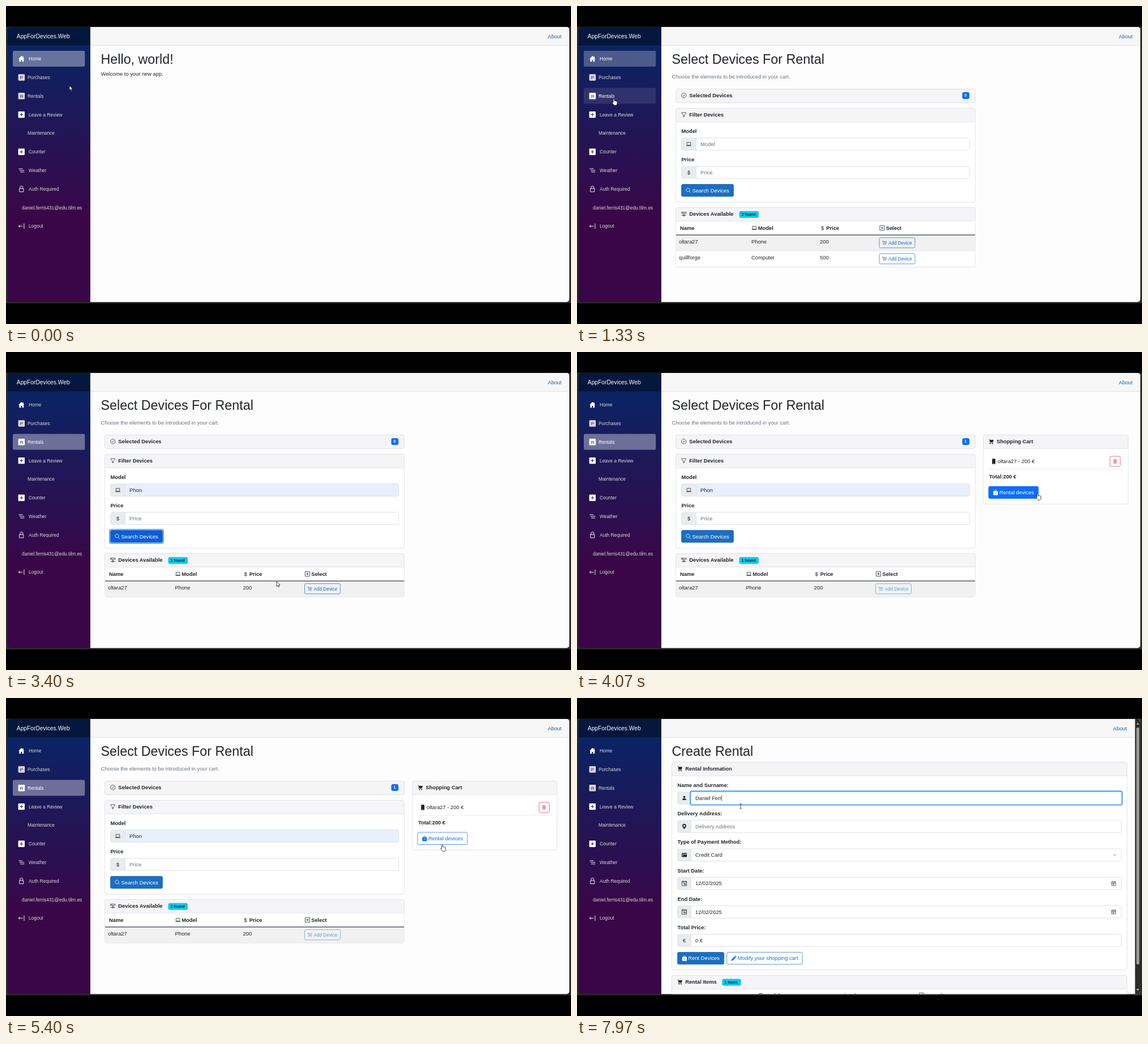
Animation of 998x561 px, one loop 8 s. Source, as an HTML page:

```html
<!DOCTYPE html>
<html lang="en">
<head>
<meta charset="utf-8">
<title>AppForDevices.Web</title>
<style>
html, body { margin: 0; width: 998px; height: 561px; overflow: hidden; background: #000; }
svg { display: block; font-family: "Liberation Sans", Arial, sans-serif; white-space: pre; }
</style>
</head>
<body>
<svg width="998" height="561" viewBox="0 0 998 561">
  <defs>
    <linearGradient id="side" x1="0" y1="0" x2="0" y2="1">
      <stop offset="0" stop-color="#052767"/><stop offset=".7" stop-color="#3a0647"/>
    </linearGradient>
    <clipPath id="window"><rect x="2.5" y="37" width="992.5" height="485.3" rx="5"/></clipPath>
  </defs>
  <rect y="36.5" width="998" height="488" fill="#2a2d29"/>
  <g id="view" clip-path="url(#window)"></g>
  <g id="pointer" stroke="#000" stroke-width=".7" stroke-linejoin="round"></g>
</svg>
<script>
const LOOP = 8000, OPEN_SELECT = 1330, SEARCH = 3050, ADD = 3700, OPEN_CREATE = 5500;
const INK = '#212529', GRAY = '#6c757d', LINE = '#dcdfe3', BLUE = '#0d6efd', BUTTON = '#1b6ec2', RING = '#258cfb';
const view = document.getElementById('view'), pointer = document.getElementById('pointer');
const pen = document.createElement('canvas').getContext('2d');
pen.font = '9.33px "Liberation Sans", Arial, sans-serif';

// 16-unit icons: [path, filled]
const ICONS = {
  house: ['M8 .8 .8 8h1.7v7h4v-4.5h3V15h4V8h1.7L13 5.8V2h-2v1.8z', 1],
  letter: ['M2 0h12q2 0 2 2v12q0 2-2 2H2q-2 0-2-2V2q0-2 2-2z', 1],
  plusFill: ['M1.5 0h13q1.5 0 1.5 1.5v13q0 1.5-1.5 1.5h-13Q0 16 0 14.5v-13Q0 0 1.5 0zM7.3 4v3.3H4v1.4h3.3V12h1.4V8.7H12V7.3H8.7V4z', 1],
  list: ['M1 4h10M3 8h12M5 12h10'],
  lock: ['M4.5 7V4a3.5 3.5 0 0 1 7 0v3M3 7h10v8H3z'],
  logout: ['M1 8h10M4.5 4.500 1 8l3.500 3.500M14.500 1.500v13'],
  check: ['M8 .8a7.200 7.200 0 1 0 .01 0zM4.500 8l2.500 2.800 4.500-5.500'],
  funnel: ['M1.500 1.500h13V4l-5 5v4.500l-3 1V9l-5-5z'],
  laptop: ['M2.500 3h11v8.500h-11zM.3 13.300h15.400'],
  search: ['M6.500 1a5.500 5.500 0 1 0 .01 0M10.500 10.500l5 5'],
  stack: ['M1 2.500h14v4H1zM3 4.500h2M8 6.500V12M1 12.500h5m4 0h5M6 11h4v3H6z'],
  plus: ['M1 1h14v14H1zM8 4v8M4 8h8'],
  cart: ['M0 1h3l.6 2H15l-1.500 7.500H5l.3 1.500H13v1H4.500L2.300 2H0zM5 13a1.500 1.500 0 1 0 .01 0zM12 13a1.500 1.500 0 1 0 .01 0z', 1],
  cartAdd: ['M0 1.500h2.500l2 9h9l1.500-7H3M9 5v4M7 7h4M5.500 12.500a1 1 0 1 0 .01 0M12 12.500a1 1 0 1 0 .01 0'],
  bag: ['M4.500 4V3.500a3.500 3.500 0 0 1 7 0V4H15v10q0 2-2 2H3q-2 0-2-2V4zM5.700 4h4.600v-.5a2.300 2.300 0 0 0-4.600 0zM7.500 12.500l4-4-.8-.8-3.200 3.200L6 9.400l-.8.8z', 1],
  phone: ['M5 0h6q2 0 2 2v12q0 2-2 2H5q-2 0-2-2V2q0-2 2-2zM8 13a1 1 0 1 0 .01 0z', 1],
  trash: ['M1.500 3.500h13M5.500 3V1.500h5V3M3 4l.6 11h8.800L13 4M6 6v6.500M8 6v6.500M10 6v6.500'],
  person: ['M8 1.500a3.200 3.200 0 1 0 .01 0zM2 14q0-5 6-5t6 5z', 1],
  pin: ['M8 0a6 6 0 0 1 6 6q0 4-6 10Q2 10 2 6a6 6 0 0 1 6-6zM8 3a3 3 0 1 0 .01 0z', 1],
  card: ['M0 4q0-2 2-2h12q2 0 2 2v1H0zM0 7h16v5q0 2-2 2H2q-2 0-2-2zM2 9v2h3V9z', 1],
  calendar: ['M1 2h14v13H1zM1 4h14M4 0v2M12 0v2M5 8h2v4M9 8h3v4H9z'],
  picker: ['M1.500 1.500h13v13h-13zM1.500 5h13M4 8h8M4 11h6M4 0v2M12 0v2'],
  pencil: ['M12.500 0 16 3.500 14 5.500 10.500 2zM9.700 2.800l3.500 3.500L5 14.500l-5 1.500 1.500-5z', 1],
  chevron: ['M2 5l6 6 6-6']
};
const NAV = [['Home', 'house', 40], ['Purchases', 'P', 38], ['Rentals', 'R', 38], ['Leave a Review', 'plusFill', 40],
  ['Maintenance', '', 38], ['Counter', 'plusFill', 40], ['Weather', 'list', 40], ['Auth Required', 'lock', 40],
  ['daniel.ferris431@edu.tilm.es', '', 28], ['Logout', 'logout', 40]];
// pointer tip: time, x, y
const PATH = [[0, 112, 140.4], [400, 112, 140.4], [870, 100, 133], [1170, 65, 163.5], [1500, 65, 163.5], [2080, 290, 243],
  [2700, 290, 243], [2980, 235, 327], [3130, 235, 327], [3400, 478, 405], [3640, 560, 419], [3760, 560, 419],
  [4070, 813.5, 249.5], [4500, 800, 252], [5000, 775, 251], [5400, 770.5, 258.8], [5560, 770.5, 258.8],
  [6130, 328, 181], [6350, 300, 178], [6600, 289, 191]];
const NAME = 'Daniel Ferr', NAME_TIMES = [6830, 6950, 7100, 7300, 7400, 7500, 7570, 7730, 7780, 7830, 7970];
const MODEL_TIMES = [2470, 2570, 2670, 2770];
const CURSORS = {
  arrow: 'M0 0v8.600l2-1.900 1.300 3 1.400-.6-1.300-2.900h2.700z',
  hand: 'M-1 .7q1-1.400 2 0v3.300q1-.7 1.800.1 1-.5 1.700.4 1.500-.3 1.500 1v3q0 3-2.400 3.300H1.200Q-.2 11.400-2.600 7.200q0-1.600 1.600-.7z',
  beam: 'M-1.800-4.300q1.800 0 1.800.8 0-.8 1.800-.8M0-3.500v7m-1.800.8q1.800 0 1.800-.8 0 .8 1.800.8'
};

let mouse, cursor;

const text = (x, y, str, size = 9.33, fill = INK, weight = 400) =>
  `<text x="${x}" y="${y + size * .355}" font-size="${size}" fill="${fill}" font-weight="${weight}">${str}</text>`;
const bold = (x, y, str, size, fill) => text(x, y, str, size, fill, 700);
const box = (x, y, x2, y2, fill, stroke = 'none', r = 0, width = .7) =>
  `<rect x="${x}" y="${y}" width="${x2 - x}" height="${y2 - y}" rx="${r}" fill="${fill}" stroke="${stroke}" stroke-width="${width}"/>`;
const icon = (name, x, y, size = 9.33, color = INK) => {
  const [d, filled] = ICONS[name];
  const paint = filled ? `fill="${color}" fill-rule="evenodd"` : `fill="none" stroke="${color}" stroke-width="1.3"`;
  return `<path transform="translate(${x} ${y - size / 2}) scale(${size / 16})" d="${d}" ${paint}/>`;
};
const over = (x, y, x2, y2, kind, pad = 0) => {
  const hit = mouse.x >= x - pad && mouse.x <= x2 + pad && mouse.y >= y - pad && mouse.y <= y2 + pad;
  if (hit) cursor = kind;
  return hit;
};
const count = (times, t) => times.filter(k => t >= k).length;
const ring = (x, y, x2, y2) =>
  box(x - 2.3, y - 2.3, x2 + 2.3, y2 + 2.3, RING, 'none', 4) + box(x - .9, y - .9, x2 + .9, y2 + .9, '#fff', 'none', 3);

const card = (x, y, x2, y2, head, mark, title) =>
  box(x, y + .8, x2, y2 + .8, '#0000000d', 'none', 3.5) + box(x, y, x2, y2, '#fff', LINE, 3.5) +
  box(x, y, x2, head, '#f5f5f7', LINE, 3) + icon(mark, x + 9.6, (y + head) / 2 - .7) +
  bold(x + 23.8, (y + head) / 2 - .7, title);
const badge = (x, y, x2, str, fill, color) =>
  box(x, y - 6, x2, y + 6, fill, 'none', 3.3) + bold(x + 4, y, str, 7, color);

function button(x, y, x2, y2, mark, label, fill, color, border, size = 9.33) {
  return box(x, y, x2, y2, fill, border, 2.5) + icon(mark, x + (size < 9 ? 5 : 7.7), (y + y2) / 2, size, color) +
    text(x + (size < 9 ? 16 : 19), (y + y2) / 2, label, size, color);
}

function field(x, y, x2, split, mark, value, { hint = '', focus = false, fill = '#fff' } = {}) {
  const y2 = y + 21.5, mid = y + 10.7, center = (x + split) / 2;
  over(split, y, x2, y2, 'beam', 4);
  return box(x, y, x2, y2, '#e9ecef', LINE, 3) +
    (focus ? ring(split, y, x2, y2) : '') +
    box(split, y, x2, y2, fill, focus ? '#86b7fe' : LINE, 2) +
    (ICONS[mark] ? icon(mark, center - 4.7, mid) : text(center - 2.6, mid, mark)) +
    text(split + 7.6, mid, value || hint, 9.33, value ? INK : GRAY) +
    (focus ? box(split + 7.8 + pen.measureText(value).width, mid - 5, split + 8.4 + pen.measureText(value).width, mid + 5, '#000') : '');
}

function sidebar(t) {
  const fade = Math.min(1, Math.max(0, (t - OPEN_SELECT) / 80));
  let out = box(2, 37, 148.8, 523, 'url(#side)') + box(2, 37, 148.8, 69.6, '#0006') +
    text(18.8, 53, 'AppForDevices.Web', 10.26, '#fff');
  NAV.forEach(([label, mark, x], i) => {
    const y = 93.2 + 32.8 * i, top = y - 14.2;
    const hover = over(12, top, 139.3, top + 28, 'hand');
    let alpha = hover ? .1 : 0;
    if (i === 0 && t < OPEN_SELECT + 80) alpha = t < OPEN_SELECT ? .37 : .26 * (1 - fade);
    if (i === 2 && t >= OPEN_SELECT && t < OPEN_CREATE) alpha = .1 + .27 * fade;
    const color = alpha ? '#fff' : '#d7d7d7';
    if (alpha) out += box(12, top, 139.3, top + 28, `rgba(255,255,255,${alpha.toFixed(3)})`, 'none', 2.3);
    if (mark.length === 1) out += icon('letter', 21.6, y, 11.6, color) + text(24.8, y, mark, 8, '#1d1c5c');
    else if (mark) out += icon(mark, 21.6, y, 11.4, '#fff');
    out += text(x, y, label, 8.4, color);
  });
  return out;
}

const home = () => text(167.5, 94, 'Hello, world!', 23.3) + text(167.5, 119.7, 'Welcome to your new app.');

function select(t) {
  const found = t < SEARCH ? 2 : 1, inCart = t >= ADD;
  const model = 'Phon'.slice(0, count(MODEL_TIMES, t));
  const searchFocus = t >= 3000 && t < ADD;
  const [cModel, cPrice, cSelect] = found === 2 ? [308, 429, 534] : [298.5, 418.5, 527.5];
  let out = text(167.5, 94, 'Select Devices For Rental', 23.3) +
    text(167.5, 124.500, 'Choose the elements to be introduced in your cart.', 9.33, GRAY) +
    card(174.5, 146.5, 703.5, 170.5, 170.5, 'check', 'Selected Devices') +
    badge(680.5, 158, 693.2, inCart ? '1' : '0', BLUE, '#fff') +
    card(174.5, 180.5, 703.5, 346, 204.5, 'funnel', 'Filter Devices') +
    bold(184.5, 220.700, 'Model') + bold(184.5, 270.700, 'Price') +
    field(184.5, 232.8, 693.5, 210.5, 'laptop', model,
      { hint: 'Model', focus: t >= 2170 && t < 3000, fill: model.length === 4 ? '#e8f0fe' : '#fff' }) +
    field(184.5, 282.8, 693.5, 210.5, '$', '', { hint: 'Price' });
  const searchHot = over(184.5, 314.5, 276.5, 336, 'hand');
  if (searchFocus) out += ring(184.5, 314.5, 276.5, 336);
  out += button(184.5, 314.5, 276.5, 336, 'search', 'Search Devices', searchHot || searchFocus ? '#0b5ed7' : BUTTON, '#fff', '#1861ac') +
    card(174.5, 355.5, 703.5, 404 + 28.200 * found, 379.5, 'stack', 'Devices Available') +
    badge(286.5, 367.7, 321, found + ' found', '#0dcaf0', INK) +
    bold(182, 391.5, 'Name') + icon('laptop', cModel + .5, 391.5) + bold(cModel + 11.8, 391.5, 'Model') +
    text(cPrice + 2, 391.5, '$') + bold(cPrice + 11.2, 391.5, 'Price') +
    icon('plus', cSelect + .3, 391.5) + bold(cSelect + 11.7, 391.5, 'Select') +
    box(175, 404, 703.2, 432, '#f1f1f2') + box(175, 403.3, 703.2, 404.6, '#3f4262');
  const rows = [['oltara27', 'Phone', 200], ['quillforge', 'Computer', 500]];
  rows.slice(0, found).forEach(([name, kind, price], i) => {
    const y = 415.5 + 28.200 * i, top = y - 6.800;
    const hot = !inCart && over(cSelect, top, cSelect + 63, top + 18, 'hand');
    if (i) out += box(175, 431.700, 703.2, 432.300, LINE);
    out += text(180, y, name) + text(cModel, y, kind) + text(cPrice, y, price) +
      `<g opacity="${inCart ? .65 : 1}">` +
      button(cSelect, top, cSelect + 63, top + 18, 'cartAdd', 'Add Device', hot ? BLUE : 'none', hot ? '#fff' : BUTTON, BUTTON, 8.17) + '</g>';
  });
  if (inCart) {
    over(727, 237, 815, 258.5, 'hand', 1);
    const hot = over(727, 237, 815, 258.5, 'hand');
    out += card(717.5, 146.5, 973.5, 268.3, 170.5, 'cart', 'Shopping Cart') +
      icon('phone', 731.5, 193) + text(743, 193, 'oltara27 - 200 €') +
      box(941.5, 184, 959.5, 202, 'none', '#dc3545', 2.3) + icon('trash', 946.4, 193, 8.17, '#dc3545') +
      box(727, 206.700, 964, 207.300, LINE) + bold(728, 219.700, 'Total:200 €') +
      button(727, 237, 815, 258.5, 'bag', 'Rental devices', hot ? BLUE : '#fff', hot ? '#fff' : BLUE, BLUE);
  }
  return out;
}

function create(t) {
  const name = NAME.slice(0, count(NAME_TIMES, t));
  const fields = [['Name and Surname:', 'person', name, { hint: 'Name and Surname', focus: t >= 6350 }],
    ['Delivery Address:', 'pin', '', { hint: 'Delivery Address' }], ['Type of Payment Method:', 'card', 'Credit Card'],
    ['Start Date:', 'calendar', '12/02/2025'], ['End Date:', 'calendar', '12/02/2025'], ['Total Price:', '€', '0 €']];
  let out = text(167.5, 94, 'Create Rental', 23.3) +
    card(167.5, 113.2, 971.5, 479.5, 137.2, 'cart', 'Rental Information');
  fields.forEach(([label, mark, value, options], i) => {
    const y = 153.7 + 50.2 * i;
    out += bold(177.5, y, label) + field(177.5, y + 12.100, 961.5, 201.5, mark, value, options);
  });
  return out + icon('chevron', 946, 277, 7) + icon('picker', 943.7, 327.5, 8.5) + icon('picker', 943.7, 377.600, 8.5) +
    button(177.5, 448.5, 259.7, 469.8, 'bag', 'Rent Devices', BUTTON, '#fff', '#1861ac') +
    button(264.7, 448.5, 398, 469.8, 'pencil', 'Modify your shopping cart', '#fff', BLUE, BUTTON) +
    card(167.5, 489.5, 971.5, 540, 513.5, 'cart', 'Rental Items') + badge(256.3, 501.5, 289.7, '1 items', '#0dcaf0', INK) +
    bold(175, 524.3, 'Name') + icon('laptop', 320, 524.3) + bold(331.5, 524.3, 'Model') +
    text(471, 524.3, '$') + bold(480, 524.3, 'Price') + icon('plus', 604, 524.3) + bold(616, 524.3, 'Quantity') +
    box(985.7, 37, 996, 523, '#2c2c2c') + box(988, 52, 993.3, 470, '#9c9c9c', 'none', 2.6) +
    '<path d="M987.800 47h5.600l-2.800-4zM987.800 513h5.600l-2.800 4z" fill="#9c9c9c"/>';
}

function locate(t) {
  const i = PATH.findIndex(p => p[0] > t);
  if (i < 0) return { x: PATH.at(-1)[1], y: PATH.at(-1)[2] };
  const [t0, x0, y0] = PATH[i - 1], [t1, x1, y1] = PATH[i];
  const u = (t - t0) / (t1 - t0), e = u * u * (3 - 2 * u);
  return { x: x0 + (x1 - x0) * e, y: y0 + (y1 - y0) * e };
}

let shown = '';
function draw(t) {
  mouse = locate(t);
  cursor = 'arrow';
  const creating = t >= OPEN_CREATE;
  const page = t < OPEN_SELECT ? home : creating ? create : select;
  const markup = box(148.8, 37, 996, 523, '#fdfdfe') + box(148.8, 37, 996, 69.6, '#f7f7f7') +
    box(148.8, 69.2, 996, 69.8, '#d6d5d5') + text(creating ? 947 : 957, 53.2, 'About', 9.33, creating ? '#006bb7' : '#1b62a8') +
    sidebar(t) + page(t);
  if (markup !== shown) view.innerHTML = shown = markup;
  pointer.innerHTML = `<path transform="translate(${mouse.x} ${mouse.y})" d="${CURSORS[cursor]}" fill="${cursor === 'beam' ? 'none' : '#fff'}"/>`;
}

const start = performance.now();
function tick() {
  draw((performance.now() - start) % LOOP);
  requestAnimationFrame(tick);
}
tick();
</script>
</body>
</html>
```
